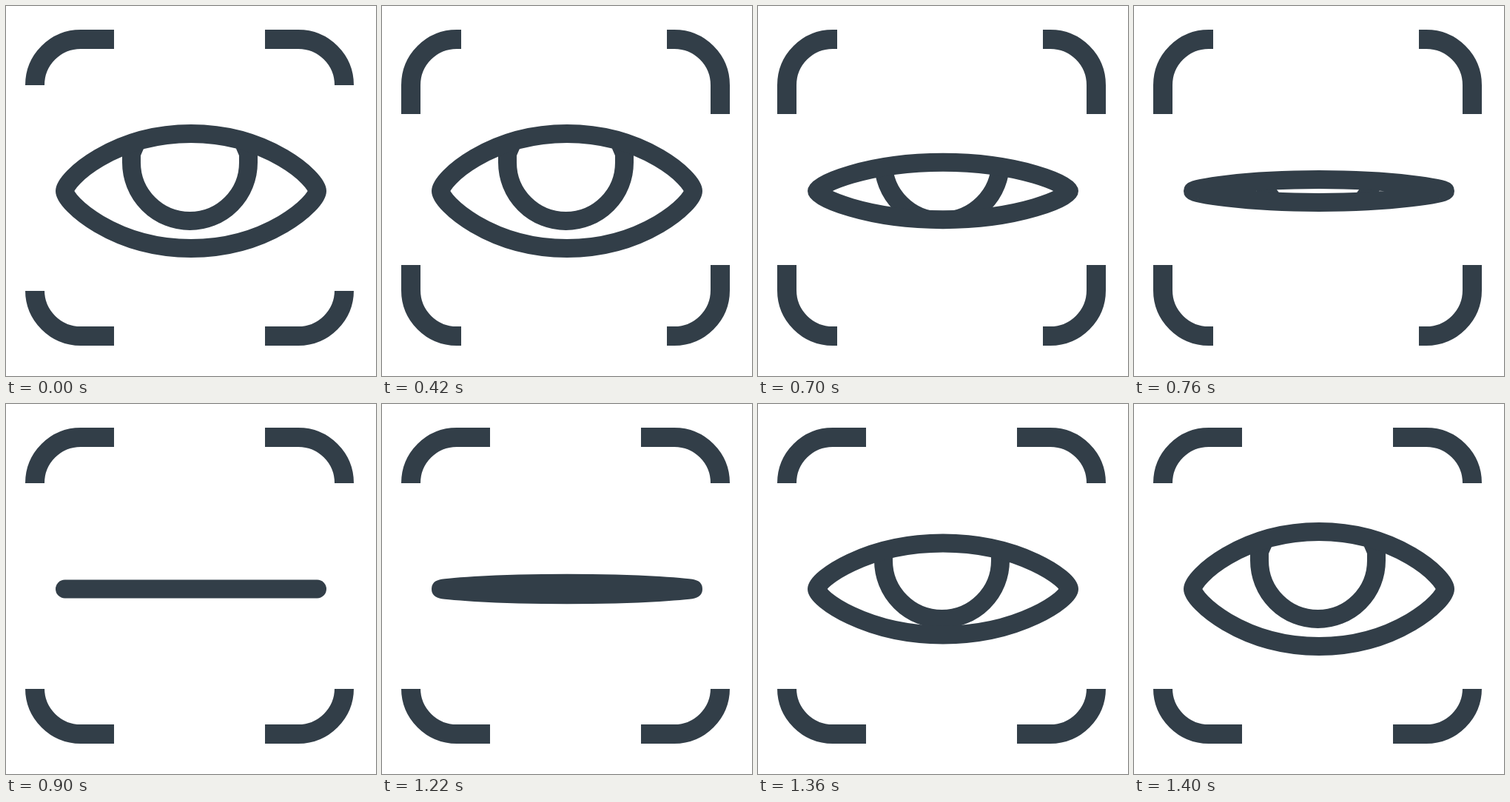
Write an HTML page with a canvas that moves like this. It is 500x500 px and loops after 2440 ms.

```html
<!DOCTYPE html>
<html lang="en">
<head>
<meta charset="utf-8">
<title>Eye scan</title>
<style>
  html, body { margin: 0; width: 100%; height: 100%; overflow: hidden; background: #fff; }
  canvas { display: block; }
</style>
</head>
<body>
<canvas id="stage" width="500" height="500"></canvas>
<script>
const ctx = document.getElementById('stage').getContext('2d');
const INK = '#323e48', PAPER = '#fff';
const LOOP = 2440, STEP = 20;
const clamp = v => Math.max(0, Math.min(1, v));

// Rounded square with its middle bands cut away, leaving four corners.
function drawCorners(tall) {
  const [x, w] = tall ? [107, 278] : [146, 204];
  const [y, h] = tall ? [146, 204] : [107, 278];
  ctx.lineWidth = 26;
  ctx.beginPath();
  ctx.roundRect(39, 45, 418, 401, 62);
  ctx.stroke();
  ctx.fillStyle = PAPER;
  ctx.fillRect(x, 0, w, 500);
  ctx.fillRect(0, y, 500, h);
}

function lidPath(open) {
  const cx = 250, cy = 250, half = 170.5, pull = 104;
  const top = 77.5 * open, tip = 16 * open;
  const l = cx - half, r = cx + half;
  const path = new Path2D();
  path.moveTo(l, cy);
  path.bezierCurveTo(l, cy - tip, cx - pull, cy - top, cx, cy - top);
  path.bezierCurveTo(cx + pull, cy - top, r, cy - tip, r, cy);
  path.bezierCurveTo(r, cy + tip, cx + pull, cy + top, cx, cy + top);
  path.bezierCurveTo(cx - pull, cy + top, l, cy + tip, l, cy);
  path.closePath();
  return path;
}

// Iris: a cup with upright sides that lean in just under the upper lid.
function irisPath() {
  const cx = 248.5, cy = 211.5, r = 79;
  const path = new Path2D();
  path.moveTo(cx + r - 6, cy - 26);
  path.lineTo(cx + r, cy - 12);
  path.arc(cx, cy, r, 0, Math.PI);
  path.lineTo(cx - r, cy - 12);
  path.lineTo(cx - r + 6, cy - 26);
  return path;
}

function drawEye(open) {
  const lids = lidPath(open);
  ctx.lineWidth = 25;
  ctx.lineJoin = ctx.lineCap = 'round';
  if (open > 0) {
    ctx.save();
    ctx.clip(lids);
    ctx.stroke(irisPath());
    ctx.restore();
    ctx.stroke(lids);
  } else {
    ctx.beginPath();
    ctx.moveTo(79.5, 250);
    ctx.lineTo(420.5, 250);
    ctx.stroke();
  }
}

function draw(ms) {
  const t = Math.floor((ms % LOOP) / STEP) * STEP;
  const open = t < 1200 ? 1 - clamp((t - 600) / 200) : clamp((t - 1200) / 200);
  ctx.fillStyle = PAPER;
  ctx.fillRect(0, 0, 500, 500);
  ctx.strokeStyle = INK;
  drawCorners(t >= 420 && t < 900);
  drawEye(open);
}

const start = performance.now();
function tick() {
  draw(performance.now() - start);
  requestAnimationFrame(tick);
}
tick();
</script>
</body>
</html>
```
